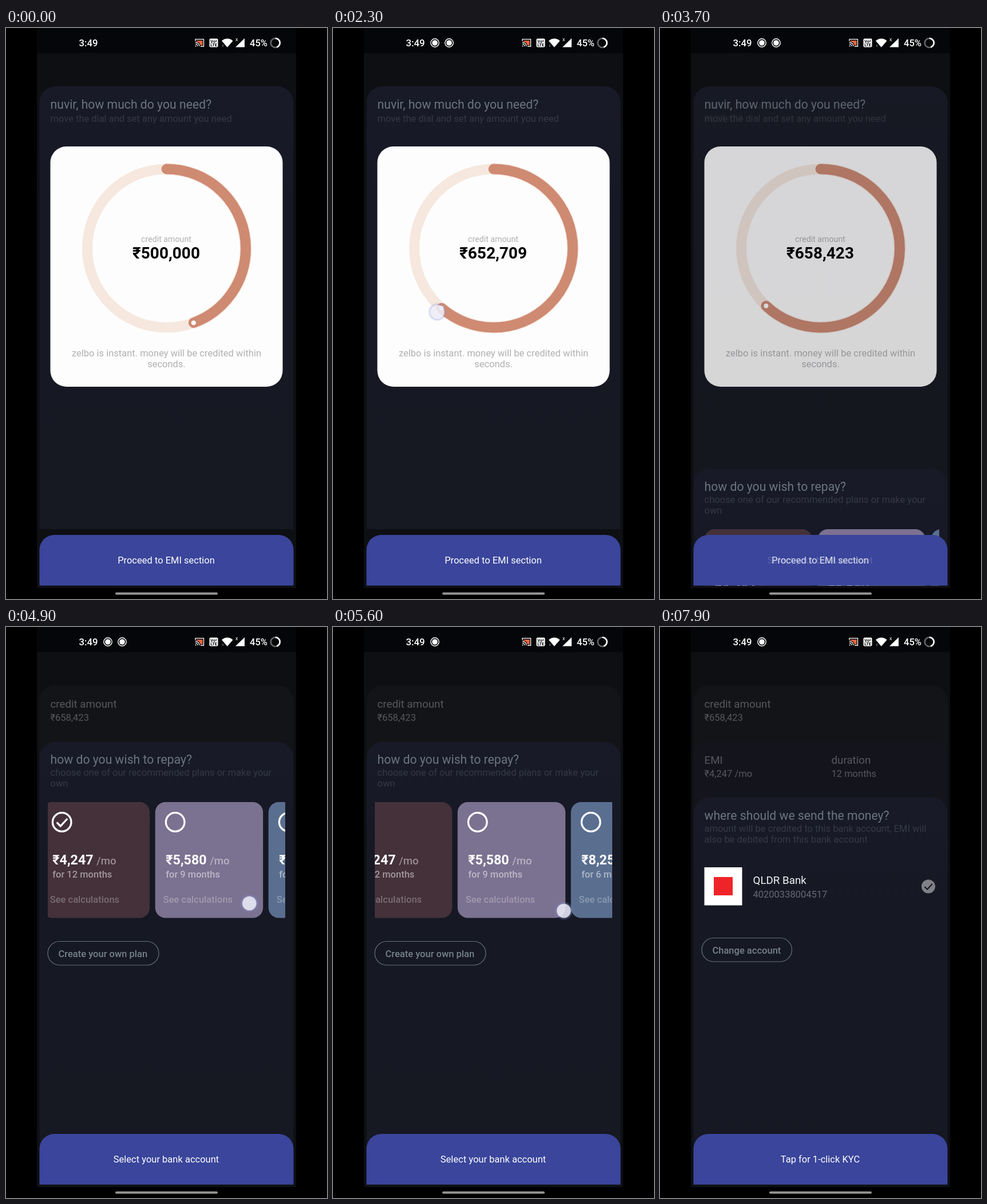
Write an HTML page that moves like this. It is 561 by 998 pixels and loops after 8000 ms.

```html
<!DOCTYPE html>
<html lang="en">
<head>
<meta charset="utf-8">
<title>Credit flow</title>
<style>
  html, body { margin: 0; width: 100%; height: 100%; overflow: hidden; background: #000; }
  svg { display: block; width: 561px; height: 998px; font-family: Roboto, "Noto Sans", sans-serif; font-size: 16.5px; }
  .title { font-size: 21.2px; fill: #6c757f; }
  .sub { fill: #363a44; }
  .head { font-size: 18.75px; fill: #55585c; }
  .val { fill: #55585c; }
  .mid { text-anchor: middle; }
  .note { fill: #b0b0b0; }
  .med { font-weight: 500; }
  .bold { font-weight: 700; }
  .pill { fill: none; stroke: #66727a; stroke-width: 1.2; }
  .pilltext { fill: #75818a; font-weight: 500; }
  .line { fill: none; stroke: #fff; }
</style>
</head>
<body>
<svg viewBox="0 0 561 998">
  <defs>
    <clipPath id="appClip"><rect x="54" y="44" width="453" height="931"/></clipPath>
    <clipPath id="listClip"><rect x="73" y="300" width="415" height="215"/></clipPath>
    <linearGradient id="sheetFill" x1="0" y1="0" x2="0" y2="1">
      <stop offset="0" stop-color="#181a28"/><stop offset=".25" stop-color="#161824"/><stop offset="1" stop-color="#161822"/>
    </linearGradient>
    <radialGradient id="glow">
      <stop offset=".7" stop-color="#8f94d8" stop-opacity=".55"/><stop offset="1" stop-color="#8f94d8" stop-opacity="0"/>
    </radialGradient>
    <path id="sheet" d="M58.5 0V-746a28 28 0 0 1 28-28H474.500a28 28 0 0 1 28 28V0z"/>
    <g id="rec"><circle r="7.2" class="line" stroke-width="1.4"/><circle r="4.8" fill="#fff"/></g>
  </defs>

  <rect width="561" height="998"/>
  <rect x="54" width="453" height="979" fill="#0e0f13"/>
  <rect x="54" width="453" height="44" fill="#050609"/>

  <g clip-path="url(#appClip)">
    <g>
      <use href="#sheet" y="876" fill="url(#sheetFill)"/>
      <use id="dim1" href="#sheet" y="876" fill="#131417"/>
      <g id="open1">
        <text x="77.500" y="140.500" class="title">nuvir, how much do you need?</text>
        <text x="77.500" y="164" class="sub">move the dial and set any amount you need</text>
        <rect x="77.500" y="207" width="406" height="420" rx="28" fill="#fdfdfd"/>
        <g transform="rotate(-90 280.500 385)" fill="none" stroke-width="18">
          <circle cx="280.500" cy="385" r="138.500" stroke="#f6e8de"/>
          <circle class="arc" cx="280.500" cy="385" r="138.500" pathLength="360" stroke="#f8ebe5" stroke-width="21" stroke-linecap="round"/>
          <circle class="arc" cx="280.500" cy="385" r="138.500" pathLength="360" stroke="#cf8a72" stroke-linecap="round"/>
        </g>
        <circle id="knob" r="4" fill="#fff"/>
        <text x="280" y="373.500" class="mid note" font-size="14.2">credit amount</text>
        <text id="amount" x="280" y="403" class="mid bold" font-size="28"></text>
        <text x="280.500" y="574" class="mid note">zelbo is instant. money will be credited within</text>
        <text x="280.500" y="593" class="mid note">seconds.</text>
      </g>
      <g id="done1">
        <text x="77.500" y="141" class="head">credit amount</text>
        <text x="77.500" y="164" class="val">₹658,423</text>
      </g>
    </g>

    <g id="sheet2">
      <use href="#sheet" y="975" fill="url(#sheetFill)"/>
      <use id="dim2" href="#sheet" y="975" fill="#14151c"/>
      <g id="open2">
        <text x="77.500" y="239" class="title">how do you wish to repay?</text>
        <text x="77.500" y="260" class="sub">choose one of our recommended plans or make your</text>
        <text x="77.500" y="278.500" class="sub">own</text>
        <g clip-path="url(#listClip)"><g id="cards"></g></g>
        <rect x="73" y="549.500" width="194" height="41.500" rx="20.700" class="pill"/>
        <text x="91.500" y="576.500" class="pilltext">Create your own plan</text>
      </g>
      <g id="done2">
        <text x="77.500" y="239" class="head">EMI</text>
        <text x="77.500" y="262" class="val">₹4,247 /mo</text>
        <text x="299.500" y="239" class="head">duration</text>
        <text x="299.500" y="262" class="val">12 months</text>
      </g>
    </g>

    <g id="sheet3">
      <use href="#sheet" y="1072" fill="url(#sheetFill)"/>
      <text x="77.500" y="337" class="title">where should we send the money?</text>
      <text x="77.500" y="358" class="sub">amount will be credited to this bank account, EMI will</text>
      <text x="77.500" y="376.500" class="sub">also be debited from this bank account</text>
      <rect x="77.500" y="420" width="66" height="66.500" fill="#fff"/>
      <rect x="94" y="437" width="33" height="32" fill="#ee2428"/>
      <text x="162.500" y="448.500" font-size="18.75" fill="#f4f4f6">QLDR Bank</text>
      <text x="162.500" y="472.500" fill="#666a70">40200338004517</text>
      <circle cx="469" cy="453.500" r="12" fill="#808186"/>
      <path d="M462.500 454l4.500 4.500 9-9.500" fill="none" stroke="#161822" stroke-width="2.200"/>
      <rect x="73" y="543.500" width="157.500" height="41.500" rx="20.700" class="pill"/>
      <text x="91.500" y="570.500" class="pilltext">Change account</text>
    </g>

    <rect id="corners" x="58.500" y="886" width="444" height="88.500" fill="#fff"/>
    <path d="M58.500 974.500V912a26 26 0 0 1 26-26H476.500a26 26 0 0 1 26 26v62.500z" fill="#3a459b"/>
    <path id="ripple" d="M58.500 974.500V912a26 26 0 0 1 26-26H476.500a26 26 0 0 1 26 26v62.500z" fill="#fff"/>
    <g class="mid" fill="#fff">
      <text id="cta1" x="280" y="936">Proceed to EMI section</text>
      <text id="cta2" x="280" y="936">Select your bank account</text>
      <text id="cta3" x="280" y="936">Tap for 1-click KYC</text>
    </g>
  </g>

  <g fill="#fff">
    <text x="127.500" y="31.500" class="med" font-size="16.800">3:49</text>
    <use id="rec1" href="#rec" x="178" y="26"/>
    <use id="rec2" href="#rec" x="203" y="26"/>
    <path d="M331 23v-3.300h14.500v12.300h-5.500" class="line" stroke-width="1.300"/>
    <path d="M333 22h10.500v8h-4a8 8 0 0 0-6.500-6.500z" fill="#f0643c"/>
    <path d="M331 25a7 7 0 0 1 7 7M331 28a4 4 0 0 1 4 4" class="line" stroke-width="1.300"/>
    <circle cx="331.500" cy="31.500" r="1"/>
    <rect x="355.500" y="18.500" width="15" height="15" rx="2"/>
    <g class="mid bold" fill="#08090c" font-size="7.200">
      <text x="363" y="25.500">Vo²</text><text x="363" y="32.300">LTE</text>
    </g>
    <path d="M377 22.500a14 14 0 0 1 19.500 0L386.800 33.800z"/>
    <path d="M379 29v4" class="line" stroke-width="1" opacity=".6"/>
    <text x="401" y="23" font-size="9">x</text>
    <path d="M417 18v15.500h-16z"/>
    <text x="426" y="31.500" class="med" font-size="16.500">45%</text>
    <circle cx="470.700" cy="26" r="8" class="line" stroke="#fff" stroke-opacity=".38" stroke-width="2.600"/>
    <path d="M470.700 18a8 8 0 0 1 2.500 15.600" class="line" stroke-width="2.600"/>
  </g>

  <g id="touch">
    <circle r="16.500" fill="url(#glow)"/>
    <circle r="12.300" fill="#fff" fill-opacity=".72"/>
  </g>
  <rect x="191" y="986.500" width="179" height="4" rx="2" fill="#959595"/>
</svg>

<script>
const LOOP = 8000;
const $ = id => document.getElementById(id);
const show = (id, a) => $(id).setAttribute('opacity', a);
const move = (id, x, y) => $(id).setAttribute('transform', `translate(${x} ${y})`);

// Linear track through [time, value, time, value, ...]
function track(t, k) {
  if (t <= k[0]) return k[1];
  for (let i = 2; i < k.length; i += 2) {
    if (t <= k[i]) return k[i - 1] + (k[i + 1] - k[i - 1]) * (t - k[i - 2]) / (k[i] - k[i - 2]);
  }
  return k[k.length - 1];
}
const easeOut = p => 1 - (1 - p) ** 3;
const rise = (t, from, to) => easeOut(track(t, [from, 0, to, 1]));
const pulse = (t, from, to) => track(t, [from, 0, from + 80, 1, to - 80, 1, to, 0]);

const VALUE = [950, 500000, 1150, 506000, 1400, 533455, 1700, 608750, 2100, 645000, 2450, 658423];
const SCROLL = [4780, 0, 4900, -14.5, 5050, -57, 5180, -93, 5280, -104, 5380, -97, 5600, -58, 5750, -25, 5900, 0];
const RIPPLE = [3330, 0, 3500, .05, 3540, .06, 3600, 0, 6300, 0, 6500, .11, 6580, .12, 6750, 0];

const plans = [
  ['#44313a', '₹4,247', 12], ['#7b7190', '₹5,580', 9], ['#5a6f90', '₹8,250', 6]
];
$('cards').innerHTML = plans.map(([color, price, months], i) => `
  <g transform="translate(${77.5 + i * 198} 306)" fill="#fff">
    <rect width="188.500" height="202.500" rx="18" fill="${color}"/>
    <circle cx="35" cy="35" r="16.300" class="line" stroke-width="3.300"/>
    ${i ? '' : '<path d="M26 35.500l6.500 6.500 12-13" class="line" stroke-width="3.300"/>'}
    <text x="18.500" y="109" class="bold" font-size="23.300">${price}
      <tspan x="95.500" class="med" font-size="18.750" fill-opacity=".45">/mo</tspan></text>
    <text x="18.500" y="132" class="med" fill-opacity=".5">for ${months} months</text>
    <text x="14" y="176" class="med" fill-opacity=".29">See calculations</text>
  </g>`).join('');

const arcs = document.querySelectorAll('.arc');
const dialAngle = t => (track(t, VALUE) - 100000) / 2500;
function onDial(deg, r) {
  const a = deg * Math.PI / 180;
  return [280.5 + r * Math.sin(a), 385 - r * Math.cos(a)];
}

function drawDial(t) {
  const deg = dialAngle(t);
  arcs.forEach(c => c.setAttribute('stroke-dasharray', `${deg} 400`));
  move('knob', ...onDial(deg, 138.5));
  $('amount').textContent = '₹' + Math.round(track(t, VALUE)).toLocaleString('en-US');
}

function drawTouch(t) {
  let pos = [0, 0], alpha = 0;
  if (t < 2700) {
    pos = onDial(dialAngle(t + 20), 148.5);
    alpha = pulse(t, 880, 2600);
  } else if (t < 4000) {
    pos = [335, 918];
    alpha = pulse(t, 3280, 3640);
  } else if (t < 6100) {
    // The finger leads the list slightly
    pos = [452 + track(t + 42, SCROLL), track(t, [4900, 483, 5600, 496])];
    alpha = pulse(t, 4700, 5860);
  } else {
    pos = [340, 922];
    alpha = pulse(t, 6250, 6640);
  }
  move('touch', ...pos);
  show('touch', alpha);
}

function drawSheets(t) {
  const p = rise(t, 3660, 4350), q = rise(t, 6600, 7050);
  show('dim1', p);
  show('open1', 1 - p);
  show('done1', p);
  move('sheet2', 0, (1 - p) * 685);
  show('sheet2', p > 0 ? 1 : 0);
  show('dim2', q);
  show('open2', 1 - q);
  show('done2', q);
  move('sheet3', 0, (1 - q) * 588);
  show('sheet3', q > 0 ? 1 : 0);
  show('cta1', 1 - p);
  show('cta2', p * (1 - q));
  show('cta3', q);
}

const start = performance.now();
function frame() {
  const t = (performance.now() - start) % LOOP;
  drawDial(t);
  drawSheets(t);
  move('cards', track(t, SCROLL), 0);
  const glow = track(t, RIPPLE);
  show('ripple', glow);
  show('corners', glow * 1.4);
  show('rec1', t < 200 ? 0 : 1);
  show('rec2', t < 300 || t > 5200 ? 0 : 1);
  drawTouch(t);
  requestAnimationFrame(frame);
}
frame();
</script>
</body>
</html>
```
